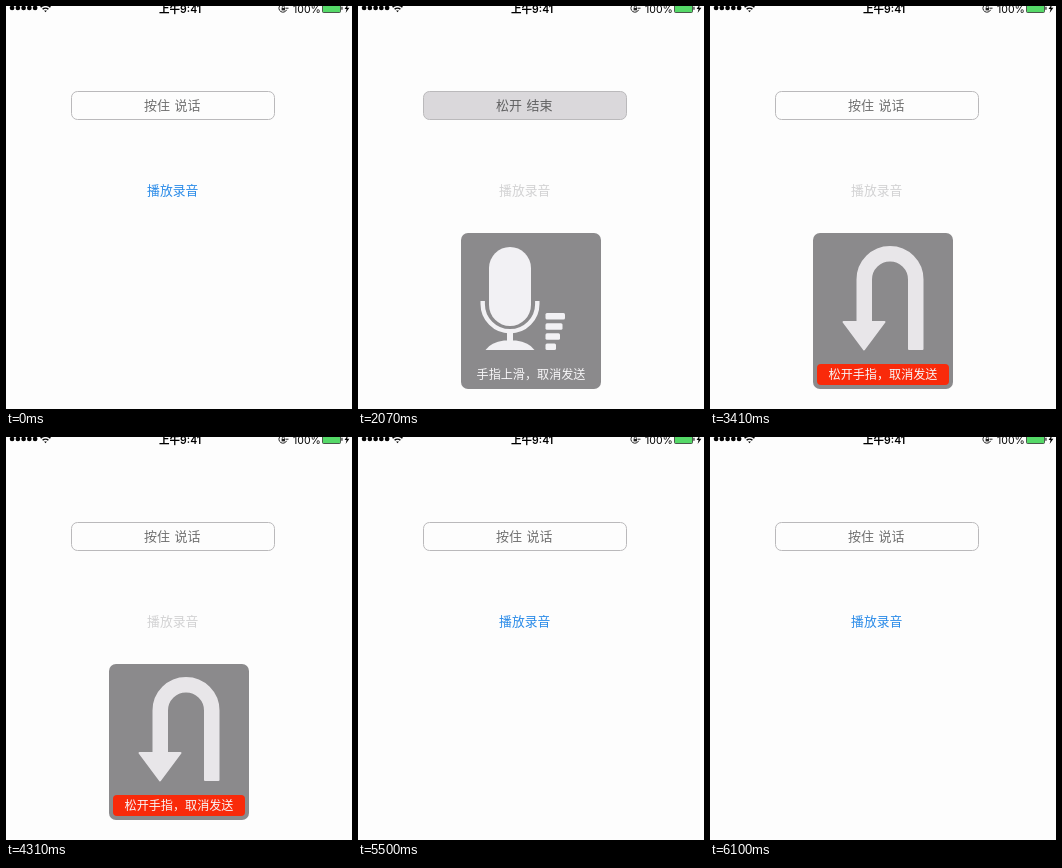
An HTML page that plays this animation: 346x403 px, repeating every 6180 ms.

```html
<!DOCTYPE html>
<html lang="zh-CN">
<head>
<meta charset="utf-8">
<title>按住说话</title>
<style>
  html, body { margin: 0; width: 100%; height: 100%; overflow: hidden; background: #fdfdfd; }
  svg { display: block; width: 346px; height: 403px; }
  text { font: 13px "Noto Sans CJK SC", "Noto Sans CJK", sans-serif; }
  .mid { text-anchor: middle; }
  .status { font-family: Inter, "Noto Sans CJK SC", "Noto Sans CJK", sans-serif; font-size: 10.5px; }
  .bold { font-weight: 600; }
  .label { word-spacing: 1.6px; }
  .tip { font-size: 12.1px; fill: #f8f7f9; }

  .idle, .held, .hud, .cancel, .high, .second, .play, .bar, .cursor {
    animation: 6180ms step-end infinite;
  }
  .idle { animation-name: idle; }
  .held { animation-name: held; }
  .hud { animation-name: hud; }
  .cancel { animation-name: cancel; }
  .second { animation-name: second; }
  .high { animation-name: high; }
  .play { animation-name: play; font-size: 12.8px; }
  .bar { animation-name: bar; }
  .cursor { animation-name: cursor; }

  @keyframes idle { 0%, 55.178% { opacity: 1 } 19.256% { opacity: 0 } }
  @keyframes held { 0%, 55.178% { opacity: 0 } 19.256% { opacity: 1 } }
  @keyframes hud { 0%, 72.006% { opacity: 0 } 19.256% { opacity: 1 } }
  @keyframes cancel { 0%, 72.006% { opacity: 0 } 55.178% { opacity: 1 } }
  @keyframes second { 0%, 55.178% { opacity: 0 } 31.068% { opacity: 1 } }
  @keyframes high { 0%, 48.058% { opacity: 0 } 31.068% { opacity: 1 } }
  @keyframes play {
    0%, 72.006%, 88.997% { fill: #2a8be8 }
    19.256% { fill: #d2d2d3 }
    79.288% { fill: #cbe2f8 }
  }
  @keyframes bar {
    0%, 98.706% { opacity: 0 }
    91.424% { opacity: .5 }
    93.851% { opacity: 1 }
    96.278% { opacity: .45 }
  }
  @keyframes cursor {
    0%, 96.278% { opacity: 0; transform: translate(330.4px, 390.6px) }
    91.424% { opacity: 1; transform: translate(262px, 163px) }
    93.851% { opacity: 1; transform: translate(330.4px, 390.6px) }
  }
</style>
</head>
<body>
<svg viewBox="0 0 346 403">
  <rect width="346" height="403" fill="#fdfdfd"/>

  <!-- status bar -->
  <path d="M6.1 2H29.5" stroke="#000" stroke-width="4.7" stroke-linecap="round" stroke-dasharray="0 5.75"/>
  <g fill="none" stroke="#000" stroke-width="1.5">
    <path d="M34.6 1.2a7 7 0 0 1 9.8 0M36.6 3.3a4.2 4.2 0 0 1 5.8 0"/>
    <path d="M38.1 4.5h2.8l-1.4 1.7z" fill="#000" stroke="none"/>
  </g>
  <text class="status bold mid" x="174.2" y="6.6">上午9:41</text>
  <g fill="none" stroke="#222">
    <path d="M280 -.4a4 4 0 1 0 .6 4.2M279.5 2.2h3"/>
    <path d="M275.6 2h3.4v2.4h-3.4z" fill="#222" stroke="none"/>
    <path d="M276.2 2v-1a1.1 1.1 0 0 1 2.2 0v1" stroke-width=".8"/>
  </g>
  <text class="status" x="287" y="6.6">100%</text>
  <rect x="316.5" y="-2.5" width="18" height="9" rx="1" fill="#55d968" stroke="#333" stroke-width=".8"/>
  <path d="M335.3 .8h1.3v3h-1.3z" fill="#333"/>
  <path d="M342 -2l-3.4 5h2l-1 4 3.8-5.2h-2.2z"/>

  <!-- talk button -->
  <rect class="held" x="65.5" y="85.5" width="203" height="28" rx="6" fill="#dad8db"/>
  <rect x="65.5" y="85.5" width="203" height="28" rx="6" fill="none" stroke="#bab9bb"/>
  <text class="idle label mid" x="166.2" y="104" fill="#707070">按住 说话</text>
  <text class="held label mid" x="166.2" y="104" fill="#616162">松开 结束</text>

  <text class="play mid" x="166.7" y="188.7">播放录音</text>

  <!-- recording panel -->
  <g class="hud">
    <rect x="103" y="227" width="140" height="156" rx="7" fill="#8b8a8c"/>
    <g class="held" fill="#f2f1f4">
      <rect x="131" y="241" width="42" height="79" rx="21"/>
      <path d="M124.7 295v3a27.3 27.3 0 0 0 54.6 0v-3" fill="none" stroke="#f2f1f4" stroke-width="4.4"/>
      <path d="M149 325h6v10h-6z"/>
      <path d="M127.5 344Q133 336 146 334.5h12Q171 336 176.5 344z"/>
      <rect x="187.5" y="337.5" width="10.5" height="6.5" rx="1.5"/>
      <rect class="second" x="187.5" y="327.3" width="14.5" height="6.5" rx="1.5"/>
      <g class="high">
        <rect x="187.5" y="317.2" width="17" height="6.5" rx="1.5"/>
        <rect x="187.5" y="307" width="19.5" height="6.5" rx="1.5"/>
      </g>
      <text class="tip mid" x="173" y="373">手指上滑，取消发送</text>
    </g>
    <g class="cancel">
      <path d="M147.5 316V273.5a32.5 32.5 0 0 1 65 0V343h-13.5V273.5a19 19 0 0 0 -38 0V316H174.5L154 343.5 133.5 316z"
        fill="#e8e6e9" stroke="#e8e6e9" stroke-width="2" stroke-linejoin="round"/>
      <rect x="107" y="358" width="132" height="21" rx="4" fill="#f92a0a"/>
      <text class="tip mid" x="173" y="373">松开手指，取消发送</text>
    </g>
  </g>

  <!-- recorder window bar -->
  <g class="bar">
    <rect width="346" height="16" fill="#343434" fill-opacity=".9"/>
    <g fill="#7c7c7c">
      <circle cx="12" cy="5" r="6"/>
      <circle cx="32" cy="5" r="6"/>
      <circle cx="52" cy="5" r="6"/>
    </g>
    <text class="mid bold" x="172" y="10" fill="#c4c4c4" letter-spacing=".2">影片录制</text>
  </g>
  <path class="cursor" d="M0 0V15L3.6 11.8 5.8 17 8.2 16 6 10.9H10.9z" stroke="#fff" stroke-opacity=".5" stroke-width=".5"/>
</svg>
</body>
</html>
```
